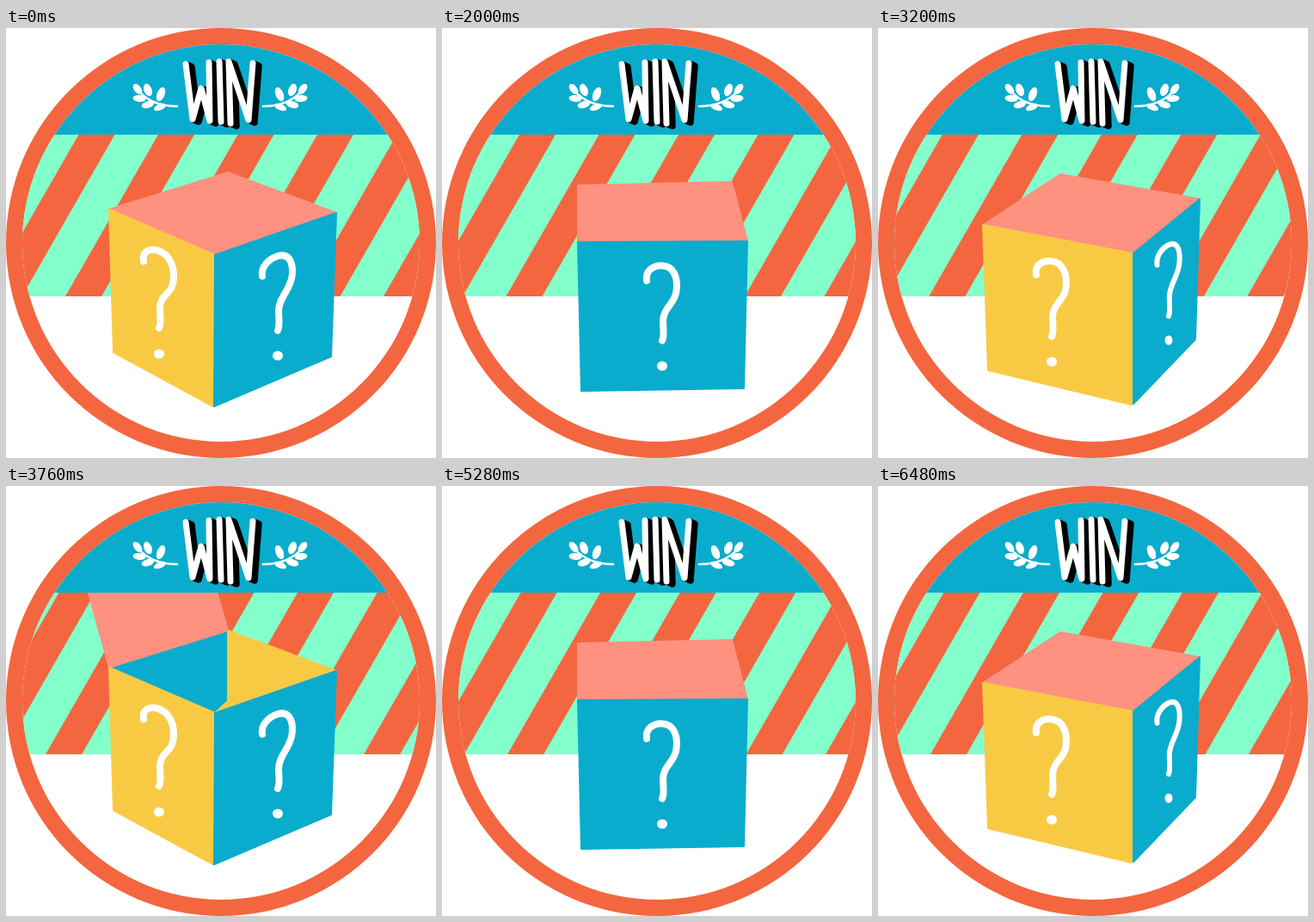
An HTML page with a canvas that plays this animation: 500 by 500 pixels, repeating every 6.56 s.

```html
<!DOCTYPE html>
<html lang="en">
<head>
<meta charset="utf-8">
<title>Mystery box</title>
<style>
html, body { margin: 0; width: 100%; height: 100%; overflow: hidden; background: #fff; }
canvas { display: block; width: 500px; height: 500px; }
</style>
</head>
<body>
<canvas id="stage" width="500" height="500"></canvas>
<script>
const ctx = document.getElementById('stage').getContext('2d');
const ORANGE = '#f4663f', MINT = '#83ffcc', BLUE = '#0aaccd';
const YELLOW = '#f8ca44', PINK = '#ff9180', BLACK = '#000', WHITE = '#fff';
const STEP = 80, STEPS = 82, TURN = 41;
const HORIZON = 124, FLOOR = 312;

const clamp = v => Math.max(0, Math.min(1, v));
const ease = v => { v = clamp(v); return v * v * (3 - 2 * v); };

function poly(color, points) {
  ctx.beginPath();
  points.forEach(p => ctx.lineTo(p[0], p[1]));
  ctx.closePath();
  ctx.fillStyle = color;
  ctx.fill();
}

function face(color, points) {
  poly(color, points);
  ctx.strokeStyle = color;
  ctx.lineWidth = 2;
  ctx.stroke();
}

function line(color, width, points) {
  ctx.beginPath();
  points.forEach(p => ctx.lineTo(p[0], p[1]));
  ctx.strokeStyle = color;
  ctx.lineWidth = width;
  ctx.stroke();
}

function oval(color, x, y, rx, ry, angle = 0) {
  ctx.beginPath();
  ctx.ellipse(x, y, rx, ry, angle, 0, Math.PI * 2);
  ctx.fillStyle = color;
  ctx.fill();
}

// Backdrop

function stripes(n) {
  const gap = 92.5, width = 42, lean = 108;
  ctx.fillStyle = MINT;
  ctx.fillRect(0, HORIZON, 500, FLOOR - HORIZON);
  const first = (69 + n * 11.32) % gap - 3 * gap;
  for (let x = first; x < 560; x += gap) {
    poly(ORANGE, [[x, FLOOR], [x + width, FLOOR], [x + width + lean, HORIZON], [x + lean, HORIZON]]);
  }
}

function branch() {
  ctx.beginPath();
  ctx.moveTo(154, 73);
  ctx.quadraticCurveTo(170, 91, 199, 91);
  ctx.strokeStyle = WHITE;
  ctx.lineWidth = 2.5;
  ctx.stroke();
  const leaves = [[153, 71, 7, 4, 0.9], [165, 72, 7.5, 4.5, 1.2], [180, 77, 8.5, 4.5, 1.95],
    [155, 82, 7.5, 4, 0.1], [165, 89, 7.5, 4, -0.3], [179, 92, 7.5, 3.5, -0.4]];
  leaves.forEach(l => oval(WHITE, ...l));
}

function lettering() {
  const letters = [
    [[209, 42], [217, 106], [227, 70], [237, 108], [236, 40]],
    [[248, 39], [250, 109]],
    [[261, 111], [259, 39], [282, 107], [287, 41]]
  ];
  for (let i = 9; i > 0; i--) {
    ctx.save();
    ctx.translate(i * 0.8, i * 0.35);
    letters.forEach(l => line(BLACK, 7, l));
    ctx.restore();
  }
  letters.forEach(l => line(WHITE, 7, l));
}

function banner() {
  ctx.fillStyle = BLUE;
  ctx.fillRect(0, 0, 500, HORIZON);
  branch();
  ctx.save();
  ctx.translate(498, 0);
  ctx.scale(-1, 1);
  branch();
  ctx.restore();
  lettering();
}

// Box

function question(cx, top, half, height, shear) {
  const at = (x, y) => [cx + x * half, top + y * height + x * half * shear];
  ctx.beginPath();
  ctx.moveTo(...at(-0.9, 0.16));
  ctx.bezierCurveTo(...at(-1, 0.06), ...at(-0.5, 0.01), ...at(-0.05, 0.01));
  ctx.bezierCurveTo(...at(0.65, 0.01), ...at(0.9, 0.12), ...at(0.84, 0.24));
  ctx.bezierCurveTo(...at(0.78, 0.39), ...at(0.05, 0.42), ...at(0.05, 0.56));
  ctx.bezierCurveTo(...at(0.05, 0.64), ...at(0.15, 0.7), ...at(0, 0.75));
  ctx.strokeStyle = WHITE;
  ctx.lineWidth = half < 18 ? 6 : 8;
  ctx.stroke();
  oval(WHITE, ...at(0, 1), half < 18 ? 4.5 : 6, 5.5);
}

const L = [120, 211], K = [258, 168], R = [384, 215], F = [243, 264];

function cornerSides(left, right) {
  face(left, [L, F, [241, 440], [125, 377]]);
  face(right, [F, R, [378, 382], [242, 440]]);
  question(178, 258, 20, 121, 0.33);
  question(316, 264, 20, 117, -0.33);
}

function cornerBox(left, right) {
  face(PINK, [L, K, R, F]);
  cornerSides(left, right);
}

function turnedBox(wide, narrow, mirrored) {
  ctx.save();
  if (mirrored) { ctx.translate(500, 0); ctx.scale(-1, 1); }
  face(PINK, [[122, 229], [212, 170], [374, 199], [296, 262]]);
  face(wide, [[122, 229], [296, 262], [295, 438], [128, 398]]);
  face(narrow, [[297, 262], [374, 199], [369, 362], [297, 437]]);
  ctx.restore();
  if (mirrored) {
    question(298, 270, 20, 118, -0.1);
    question(162, 251, 15, 112, 0.5);
  } else {
    question(202, 270, 20, 118, 0.1);
    question(338, 251, 15, 112, -0.5);
  }
}

function frontBox(color) {
  face(PINK, [[158, 183], [337, 179], [355, 248], [158, 249]]);
  face(color, [[158, 249], [355, 248], [351, 419], [162, 422]]);
  question(256, 275, 20, 118, 0);
}

const poses = [
  () => cornerBox(YELLOW, BLUE),
  () => turnedBox(BLUE, YELLOW, true),
  () => frontBox(BLUE),
  () => turnedBox(BLUE, YELLOW, false),
  () => cornerBox(BLUE, YELLOW),
  () => turnedBox(YELLOW, BLUE, true),
  () => frontBox(YELLOW),
  () => turnedBox(YELLOW, BLUE, false)
];

// One pose per step, with a short hold when starting and when settling.
function spinPose(k) {
  const holds = [24, 37, 40].filter(h => k >= h).length;
  return (k - 22 - holds) % 8;
}

function lid(angle) {
  const c = Math.cos(angle), lift = 140 * Math.sin(angle);
  const swing = (hinge, edge) =>
    [hinge[0] + (edge[0] - hinge[0]) * c, hinge[1] + (edge[1] - hinge[1]) * c - lift];
  face(PINK, [L, K, swing(K, R), swing(L, F)]);
}

// Cat

function headPath() {
  ctx.beginPath();
  ctx.moveTo(192, 130);
  ctx.quadraticCurveTo(194, 121, 201, 126);
  ctx.lineTo(221, 151);
  ctx.quadraticCurveTo(250, 143, 280, 151);
  ctx.lineTo(300, 126);
  ctx.quadraticCurveTo(307, 121, 308, 130);
  ctx.quadraticCurveTo(310, 154, 306, 172);
  ctx.quadraticCurveTo(309, 194, 298, 212);
  ctx.quadraticCurveTo(304, 226, 306, 250);
  ctx.lineTo(310, 400);
  ctx.lineTo(198, 400);
  ctx.lineTo(202, 250);
  ctx.quadraticCurveTo(202, 228, 206, 214);
  ctx.quadraticCurveTo(193, 196, 196, 172);
  ctx.quadraticCurveTo(190, 152, 192, 130);
  ctx.closePath();
}

function fur() {
  for (let row = 0; row < 10; row++) {
    const y = 156 + row * 10.5;
    for (let i = -5; i <= 5; i++) {
      const x = 250 + (i + (row % 2) / 2) * 11;
      const jitter = Math.sin(row * 5 + i * 7) * 2;
      const onEye = Math.abs(Math.abs(x - 251) - 24) < 13 && Math.abs(y - 193) < 12;
      const onMuzzle = Math.abs(x - 250) < 10 && y > 198 && y < 230;
      const onEdge = Math.abs(x - 250) > 51 || (y < 165 && Math.abs(x - 250) > 32);
      if (onEye || onMuzzle || onEdge) continue;
      line(WHITE, 1.8, [[x, y - 2.5 + jitter], [x + (x - 250) * 0.012, y + 2.5 + jitter]]);
    }
  }
}

function openEye(x) {
  ctx.beginPath();
  ctx.moveTo(x - 11, 194);
  ctx.quadraticCurveTo(x - 4, 183, x + 4, 185);
  ctx.quadraticCurveTo(x + 11, 188, x + 11, 194);
  ctx.quadraticCurveTo(x, 208, x - 11, 194);
  ctx.fillStyle = YELLOW;
  ctx.fill();
  oval(BLACK, x, 193, 5, 5.5);
  oval(WHITE, x + 1.5, 191, 1.4, 1.4);
}

function crossEye(x) {
  line(WHITE, 2.5, [[x - 8, 186], [x + 8, 200]]);
  line(WHITE, 2.5, [[x + 8, 186], [x - 8, 200]]);
}

function cat(alive, drop) {
  ctx.save();
  ctx.translate(0, drop);
  if (!alive) {
    ctx.beginPath();
    ctx.ellipse(262, 118, 23, 9, 0, 0, Math.PI * 2);
    ctx.strokeStyle = YELLOW;
    ctx.lineWidth = 4;
    ctx.stroke();
  }
  headPath();
  ctx.fillStyle = BLACK;
  ctx.fill();
  face(WHITE, [[200, 135], [215, 153], [202, 163]]);
  face(WHITE, [[302, 135], [284, 153], [299, 162]]);
  fur();
  [228, 275].forEach(alive ? openEye : crossEye);
  if (!alive) oval(PINK, 252, 223, 5, 7, -0.3);
  face(PINK, [[245, 204], [256, 204], [250, 210]]);
  line(WHITE, 2, [[243, 218], [250, 214], [258, 218]]);
  ctx.restore();
}

function openBox(k, alive) {
  const angle = 2.27 * Math.min(ease((k - 3) / 4), ease((22 - k) / 3));
  const rise = Math.min(ease((k - 6) / 5), ease((20 - k) / 3));
  face(BLUE, [L, K, [258, 250], F]);
  face(YELLOW, [K, R, F, [258, 250]]);
  const behind = angle > 1.3;
  if (behind) lid(angle);
  if (rise > 0) cat(alive, 140 * (1 - rise));
  cornerSides(YELLOW, BLUE);
  if (!behind) lid(angle);
  if (alive && k >= 11 && k <= 13) {
    line(BLACK, 2.5, [[327, 178], [332, 172]]);
    line(BLACK, 2.5, [[329, 189], [341, 181]]);
    line(BLACK, 2.5, [[350, 194], [355, 192]]);
  }
}

function draw(n) {
  const k = n % TURN;
  ctx.lineJoin = ctx.lineCap = 'round';
  ctx.fillStyle = WHITE;
  ctx.fillRect(0, 0, 500, 500);
  oval(ORANGE, 250, 250, 250, 250);
  ctx.save();
  oval(WHITE, 250, 250, 231, 231);
  ctx.clip();
  stripes(n);
  if (k > 3 && k < 22) openBox(k, n < TURN);
  else poses[k >= 22 ? spinPose(k) : 0]();
  banner();
  ctx.restore();
}

const start = performance.now();
function tick() {
  draw(Math.floor((performance.now() - start) / STEP) % STEPS);
  requestAnimationFrame(tick);
}
tick();
</script>
</body>
</html>
```
